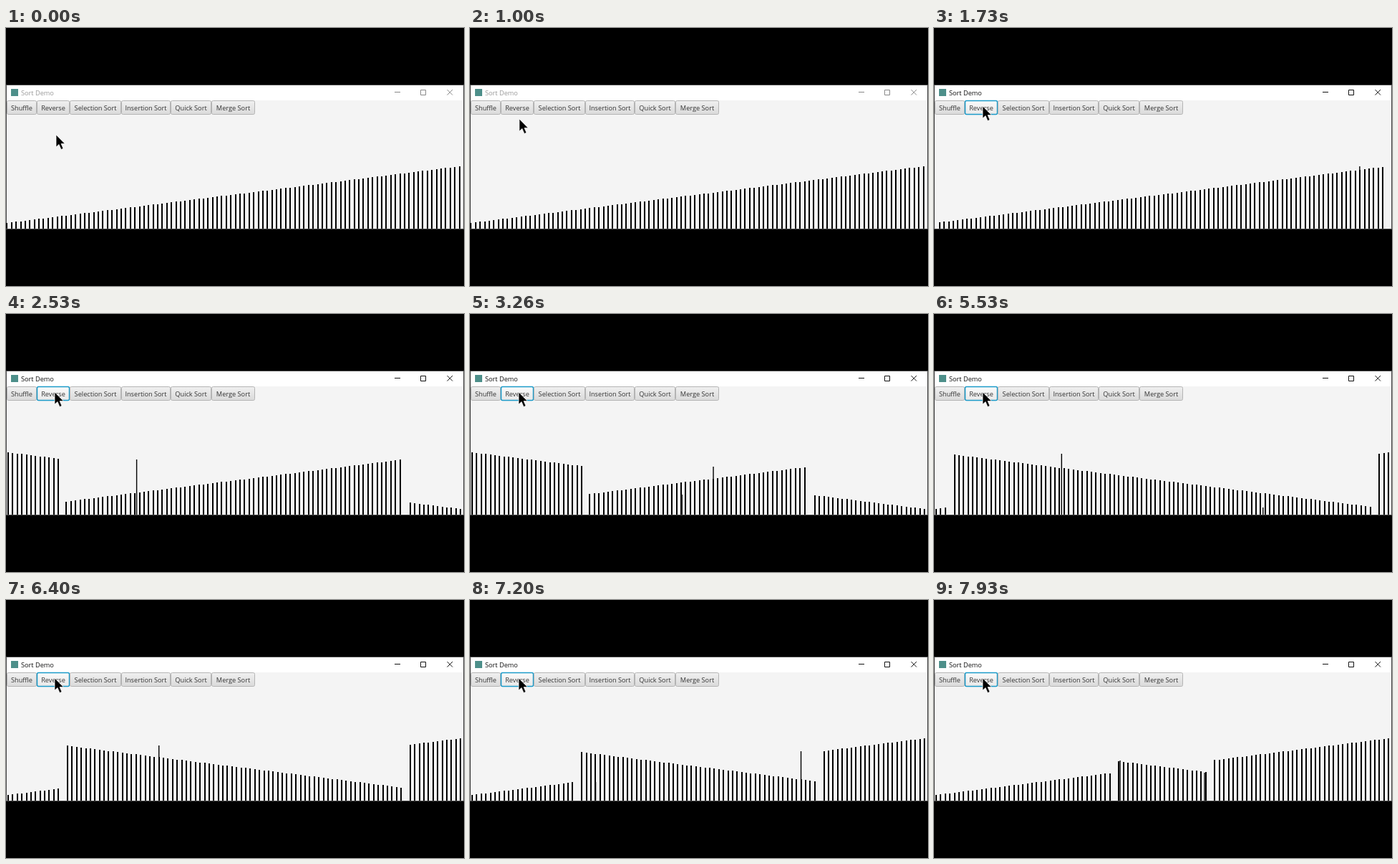
These frames come from a looping animation (640 px wide and 360 px high, 8000 ms). An HTML page:

```html
<!DOCTYPE html>
<html lang="en">
<head>
<meta charset="utf-8">
<title>Sort Demo</title>
<style>
  html, body { margin: 0; width: 100%; height: 100%; overflow: hidden; background: #000; }
  svg { display: block; width: 100%; height: 100%; }
  text { font: 9.2px "Open Sans", "Noto Sans", sans-serif; fill: #333; }
  #chrome text { fill: #999; }
  #controls { fill: none; stroke: #888; }
  .active #chrome text { fill: #111; }
  .active #controls { stroke: #111; }
  .button rect { fill: url(#face); stroke: #b4b4b4; }
  .button.hover rect { fill: url(#hoverFace); }
  .button.focus rect { stroke: #1c9bc9; stroke-width: 1.5; }
  .button.pressed rect { fill: url(#pressedFace); }
</style>
</head>
<body>
<svg id="stage" viewBox="0 0 640 360">
  <defs>
    <linearGradient id="face" x2="0" y2="1"><stop stop-color="#f0f0f0"/><stop offset="1" stop-color="#dadada"/></linearGradient>
    <linearGradient id="hoverFace" x2="0" y2="1"><stop stop-color="#fafafa"/><stop offset="1" stop-color="#e8e8e8"/></linearGradient>
    <linearGradient id="pressedFace" x2="0" y2="1"><stop stop-color="#d2d2d2"/><stop offset="1" stop-color="#e0e0e0"/></linearGradient>
  </defs>
  <rect width="640" height="360"/>
  <rect y="79" width="640" height="202" fill="#4a4a4a"/>
  <rect x="1" y="80" width="638" height="21" fill="#fff"/>
  <rect x="1" y="101" width="638" height="179" fill="#f4f4f4"/>
  <g id="chrome">
    <rect x="7" y="85" width="10" height="10" fill="#4d8f8a"/>
    <text x="21" y="93.7">Sort Demo</text>
    <g id="controls">
      <path d="M543 89.5h8M579.5 86.5h7v7h-7zM616.5 86l7.5 7.5M624 86l-7.5 7.5"/>
    </g>
  </g>
  <g id="buttons"></g>
  <g id="bars"></g>
  <path id="cursor" d="M0 0V17L4 13.5L7 20.5L10 19.2L7.1 12.5H12.3Z" stroke="#fff" stroke-width=".7"/>
</svg>
<script>
const LOOP = 8000, FRAME = 200 / 3;
const COUNT = 100, LAST = COUNT - 1, PITCH = 6.385, FLOOR = 280;

// Each run: [time in ms, number of pairs swapped so far]
const RUNS = [
  [[1726, 0], [2300, 8.8], [3260, 25.43], [4000, 40.3], [4330, 46.95], [4481, 50]],
  [[5200, 0], [5530, 3.263], [5730, 5.3], [6400, 12.28], [6960, 19.7], [7460, 28.5], [7930, 39.06], [8000, 40.7]]
];
const PRESSES = [[1400, 1700], [4930, 5180]];
const BUTTONS = [["Shuffle", 1, 43], ["Reverse", 43, 89], ["Selection Sort", 89, 161],
  ["Insertion Sort", 161, 230], ["Quick Sort", 230, 287], ["Merge Sort", 287, 348]];

const byId = id => document.getElementById(id);

function add(parent, tag, attrs) {
  const node = document.createElementNS("http://www.w3.org/2000/svg", tag);
  for (const name in attrs) node.setAttribute(name, attrs[name]);
  return parent.appendChild(node);
}

const buttons = BUTTONS.map(([label, left, right]) => {
  const group = add(byId("buttons"), "g", { class: "button" });
  add(group, "rect", { x: left + .5, y: 101.5, width: right - left - 1, height: 19, rx: 2 });
  add(group, "text", { x: (left + right) / 2, y: 115, "text-anchor": "middle" }).textContent = label;
  return group;
});
const reverse = buttons[1];

const bars = Array.from({ length: COUNT }, (_, value) => {
  const height = 8 + 79 * value / LAST;
  return add(byId("bars"), "rect", { y: FLOOR - Math.round(height), height: Math.round(height), width: 2 });
});

function pairsDone(keys, t) {
  if (t <= keys[0][0]) return 0;
  for (let i = 1; i < keys.length; i++) {
    const [t0, p0] = keys[i - 1], [t1, p1] = keys[i];
    if (t < t1) return p0 + (p1 - p0) * (t - t0) / (t1 - t0);
  }
  return keys[keys.length - 1][1];
}

function placeBars(t) {
  const second = t >= RUNS[1][0][0];
  const progress = pairsDone(RUNS[+second], t);
  const current = Math.floor(progress), part = progress - current;
  for (let value = 0; value < COUNT; value++) {
    const from = second ? LAST - value : value;
    const pair = Math.min(from, LAST - from);
    // Bars settle slightly to the right once they have been swapped.
    const start = from * PITCH + (second ? 2 : .4);
    const end = (LAST - from) * PITCH + 2;
    const moving = pair === current && part > 0;
    const x = moving ? start + (end - start) * part + .3 : Math.round(pair < current ? end : start);
    bars[value].setAttribute("x", x);
    bars[value].setAttribute("width", moving ? 1.4 : 2);
  }
}

function draw(t) {
  const k = Math.min(1, Math.max(0, (t - 540) / 860));
  const eased = k * k * (3 - 2 * k);
  const cursorY = 149 - 40 * eased;
  byId("cursor").setAttribute("transform", `translate(${70 - 2 * eased} ${cursorY})`);
  const active = t >= PRESSES[0][0];
  byId("stage").classList.toggle("active", active);
  reverse.classList.toggle("focus", active);
  reverse.classList.toggle("hover", cursorY < 121);
  reverse.classList.toggle("pressed", PRESSES.some(([down, up]) => t >= down && t < up));
  placeBars(t);
}

function tick() {
  const t = performance.now() % LOOP;
  const step = Math.floor((t + 6.7) / FRAME) % 120;
  draw(Math.floor(step * FRAME / 10 + .001) * 10);
  requestAnimationFrame(tick);
}
tick();
</script>
</body>
</html>
```
